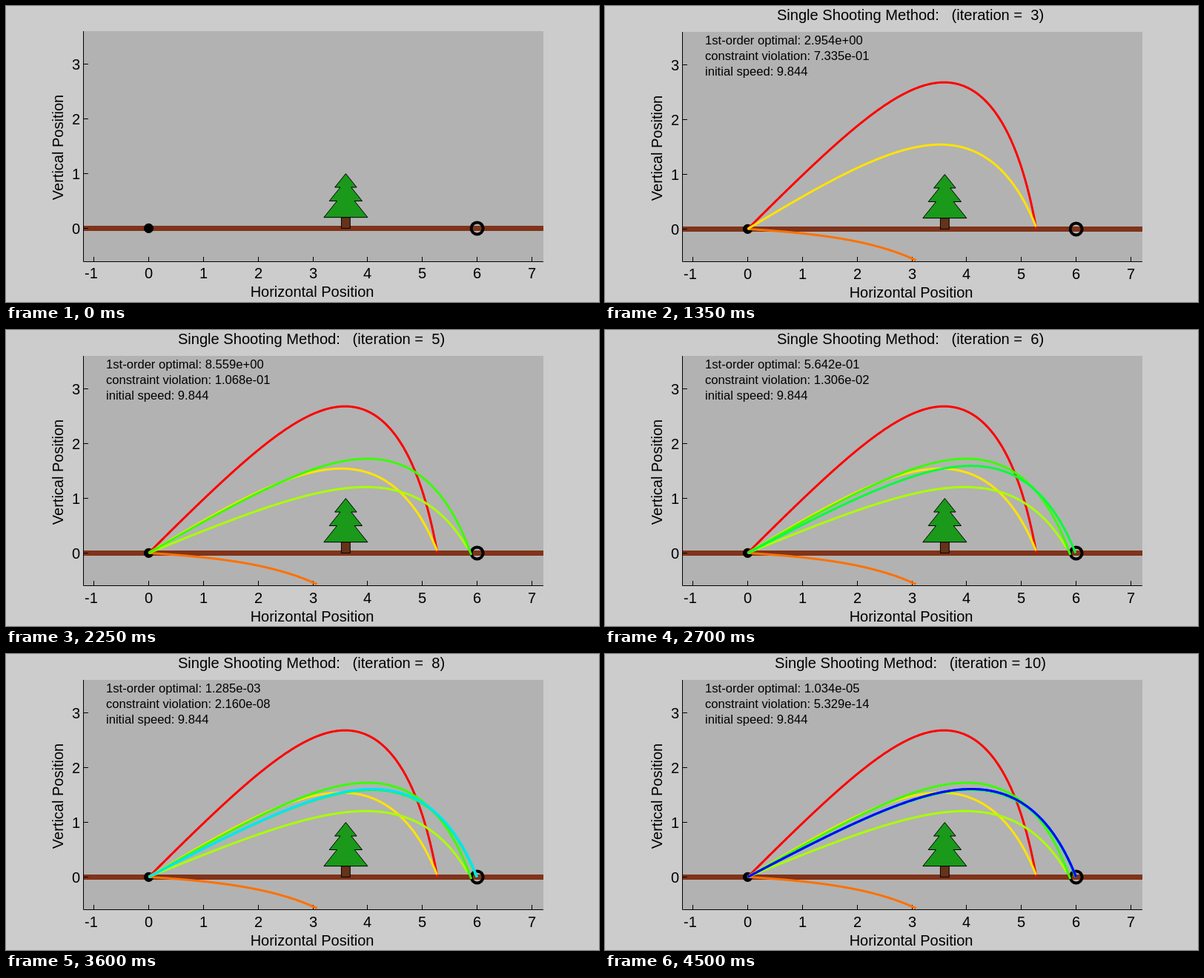
An HTML page with a canvas that plays this animation: 800 px wide and 400 px high, repeating every 4950 ms.

```html
<!DOCTYPE html>
<html lang="en">
<head>
<meta charset="utf-8">
<title>Single Shooting Method</title>
<style>
  html, body { margin: 0; width: 100%; height: 100%; overflow: hidden; background: #ccc; }
  canvas { display: block; }
</style>
</head>
<body>
<canvas id="stage" width="800" height="400"></canvas>
<script>
const ctx = document.getElementById('stage').getContext('2d');
const STEP = 450, STATES = 11;
const UNIT = 73.85, X0 = 192.5;
const FONT = '"Liberation Sans", Arial, sans-serif';
const DRAG = 0.4;

// Per iteration: peak height, end x, end y, optimality, constraint violation
const shots = [
  [2.684, 5.273, 0, '1.320e+01', '7.270e-01'],
  [0, 0, -0.572, '5.817e+00', '1.846e+00'],
  [1.545, 5.2665, 0.045, '2.954e+00', '7.335e-01'],
  [1.207, 5.825, 0.09, '9.126e+00', '1.853e-01'],
  [1.725, 5.893, -0.035, '8.559e+00', '1.068e-01'],
  [1.595, 5.99, 0, '5.642e-01', '1.306e-02'],
  [1.61, 6, 0, '1.127e-01', '8.314e-05'],
  [1.61, 6, 0, '1.285e-03', '2.160e-08'],
  [1.61, 6, 0, '2.333e-05', '2.457e-11'],
  [1.61, 6, 0, '1.034e-05', '5.329e-14']
];

// Flight with quadratic drag: y'' = -k exp(2 * DRAG * arc length)
function fly(y, slope, k, dx, endY) {
  const pts = [[0, y]];
  let x = 0, s = 0, p = slope;
  while (y > endY && Math.abs(x) < 12) {
    const sm = s + Math.hypot(1, p) * dx / 2;
    const pm = p - k * Math.exp(2 * DRAG * s) * dx / 2;
    const ny = y + pm * dx;
    const part = ny < endY ? (y - endY) / (y - ny) : 1;
    p -= k * Math.exp(2 * DRAG * sm) * dx;
    s += Math.hypot(1, pm) * dx;
    x += dx * part;
    y = part < 1 ? endY : ny;
    pts.push([x, y]);
  }
  return pts;
}

// Finds the arc with a given peak that starts at the origin and ends at (endX, endY)
function arc(peak, endX, endY) {
  let lo = 0.05, hi = 5, left, right;
  for (let i = 0; i < 32; i++) {
    const k = (lo + hi) / 2;
    left = fly(peak, 0, k, -0.01, 0);
    right = fly(peak, 0, k, 0.01, endY);
    if (right.at(-1)[0] - left.at(-1)[0] > endX) lo = k; else hi = k;
  }
  const shift = -left.at(-1)[0];
  return left.reverse().concat(right).map(([x, y]) => [x + shift, y]);
}

const paths = shots.map(([peak, endX, endY]) =>
  peak ? arc(peak, endX, endY) : fly(0, -0.0604, 0.0297, 0.01, endY));

const px = x => X0 + x * UNIT;

function label(str, x, y, align = 'center', size = 20) {
  ctx.font = size + 'px ' + FONT;
  ctx.textAlign = align;
  ctx.fillStyle = '#000';
  ctx.fillText(str, x, y);
}

function line(pts, color, width) {
  ctx.beginPath();
  for (const [x, y] of pts) ctx.lineTo(x, y);
  ctx.strokeStyle = color;
  ctx.lineWidth = width;
  ctx.stroke();
}

function shape(pts, py, color) {
  ctx.beginPath();
  for (const [x, y] of pts) ctx.lineTo(px(3.6 + x), py(y));
  ctx.closePath();
  ctx.fillStyle = color;
  ctx.fill();
  ctx.strokeStyle = '#000';
  ctx.lineWidth = 1;
  ctx.stroke();
}

function tree(py) {
  shape([[-0.08, 0], [-0.08, 0.2], [0.08, 0.2], [0.08, 0]], py, '#66331a');
  const side = [[0.2, 0.75], [0.1, 0.75], [0.3, 0.5], [0.16, 0.5], [0.4, 0.2]];
  const mirror = side.map(([x, y]) => [-x, y]).reverse();
  shape([[0, 1], ...side, ...mirror], py, '#1a991a');
}

function axes(py, drop) {
  line([[104.5, 34 + drop], [104.5, 345.5], [725, 345.5]], '#000', 1);
  for (let x = -1; x <= 7; x++) {
    const tx = Math.floor(px(x)) + 0.5;
    line([[tx, 345], [tx, 339]], '#000', 1);
    label(x, x < 0 ? tx - 3.5 : tx, 368 + drop);
  }
  for (let y = 0; y <= 3; y++) {
    const ty = Math.floor(py(y)) + 0.5;
    line([[105, ty], [111, ty]], '#000', 1);
    label(y, 100, ty + 7, 'right');
  }
  label('Horizontal Position', 413, 393 + drop);
  ctx.save();
  ctx.translate(76.5, 191 + drop);
  ctx.rotate(-Math.PI / 2);
  label('Vertical Position', 0, 0);
  ctx.restore();
}

function markers(y) {
  ctx.beginPath();
  ctx.arc(X0, y, 6.6, 0, 7);
  ctx.fillStyle = '#000';
  ctx.fill();
  ctx.beginPath();
  ctx.arc(px(6), y, 8, 0, 7);
  ctx.strokeStyle = '#000';
  ctx.lineWidth = 4;
  ctx.stroke();
}

function report(n) {
  const [, , , optimal, violation] = shots[n - 1];
  label(`Single Shooting Method:   (iteration = ${String(n).padStart(2)})`, 412, 19, 'center', 20.1);
  label('1st-order optimal: ' + optimal, 135, 52, 'left', 16.6);
  label('constraint violation: ' + violation, 135, 73, 'left', 16.6);
  label('initial speed: 9.844', 135, 94, 'left', 16.6);
}

function draw(n) {
  const drop = n ? 1 : 0;
  const py = y => 300.4 + drop - y * UNIT;
  ctx.fillStyle = '#ccc';
  ctx.fillRect(0, 0, 800, 400);
  ctx.fillStyle = '#b2b2b2';
  ctx.fillRect(104, 34 + drop, 621, 312 - drop);
  ctx.fillStyle = '#80331a';
  ctx.fillRect(105, 297 + drop, 620, 7);
  axes(py, drop);
  tree(py);
  markers(py(0));

  ctx.lineJoin = 'round';
  for (let i = 0; i < n; i++) {
    const pts = paths[i].map(([x, y]) => [px(x), py(y)]);
    line(pts, `hsl(${i * 240 / 9}, 100%, 50%)`, 3);
  }
  ctx.lineJoin = 'miter';
  if (n) report(n);
}

function tick() {
  draw(Math.floor(performance.now() / STEP) % STATES);
  requestAnimationFrame(tick);
}
tick();
</script>
</body>
</html>
```
